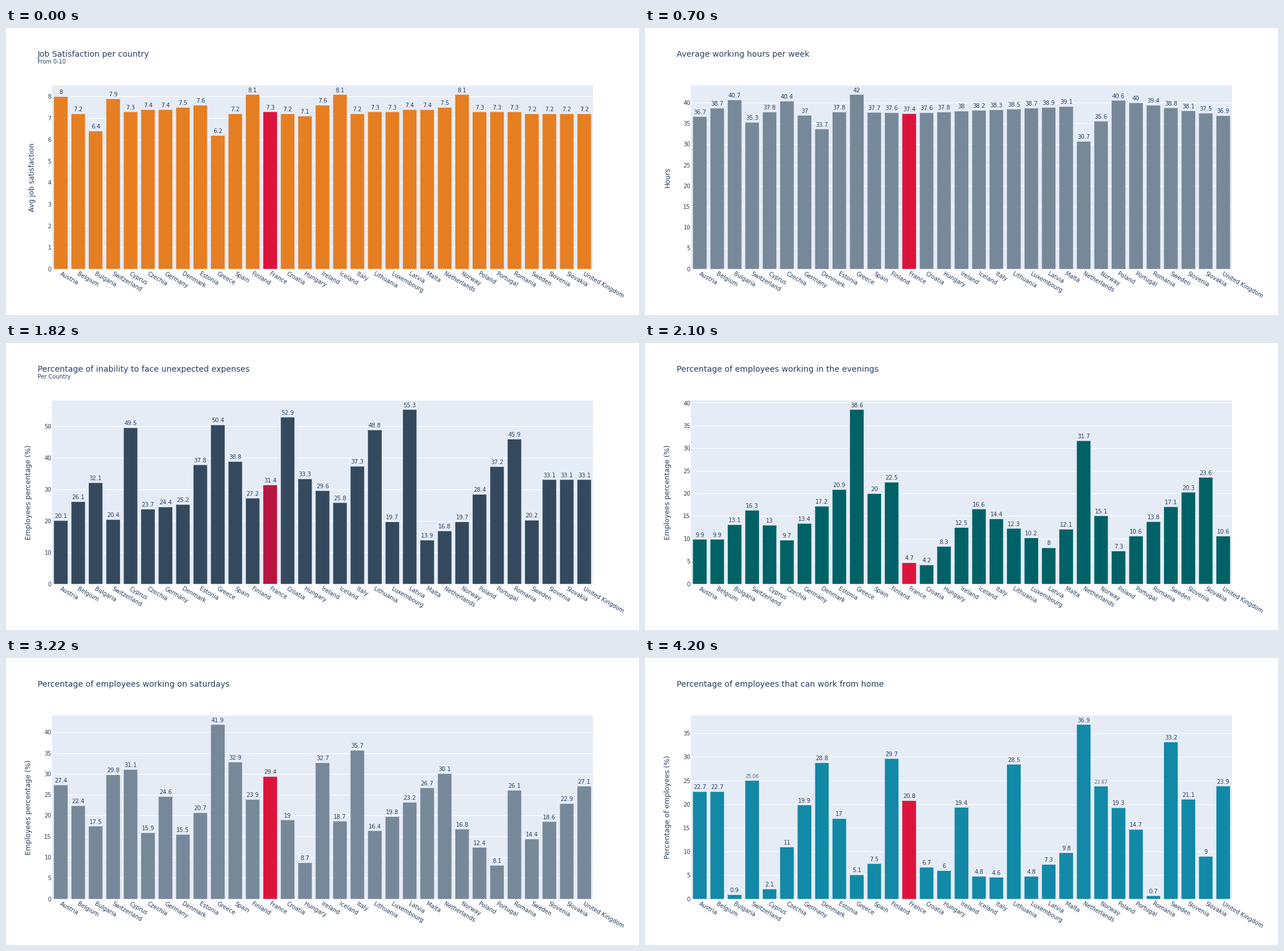
Write a matplotlib script that moves like this. It is 1100x500 px and loops after 4900 ms.

```python
from collections import namedtuple
import math

import matplotlib.pyplot as plt
import numpy as np
from matplotlib.animation import FuncAnimation
from matplotlib.patches import Rectangle

W, H, DPI = 1100, 500, 100
LEFT, RIGHT, TOP, BASE = 80, 1020, 100, 420
INK, PANEL, CRIMSON = "#2a3f5f", "#E5ECF6", "#DC143C"
PX = 72 / DPI  # points per pixel

plt.rcParams["font.family"] = "DejaVu Sans"

COUNTRIES = (
    "Austria,Belgium,Bulgaria,Switzerland,Cyprus,Czechia,Germany,Denmark,"
    "Estonia,Greece,Spain,Finland,France,Croatia,Hungary,Ireland,Iceland,"
    "Italy,Lithuania,Luxembourg,Latvia,Malta,Netherlands,Norway,Poland,"
    "Portugal,Romania,Sweden,Slovenia,Slovakia,United Kingdom"
).split(",")
SLOT = (RIGHT - LEFT) / len(COUNTRIES)


def series(UK=None, **points):
    """Key countries are fixed; those between them are interpolated."""
    if UK is not None:
        points["United Kingdom"] = UK
    known = [i for i, name in enumerate(COUNTRIES) if name in points]
    line = np.interp(range(len(COUNTRIES)), known,
                     [points[COUNTRIES[i]] for i in known])
    return [points.get(name, round(v, 1)) for name, v in zip(COUNTRIES, line)]


Chart = namedtuple("Chart", "values color step title ylabel subtitle accent",
                   defaults=("", CRIMSON))
SHARE = "Employees percentage (%)"
CHARTS = [
    Chart(series(Austria=8, Bulgaria=6.4, Switzerland=7.9, Cyprus=7.3,
                 Estonia=7.6, Greece=6.2, Finland=8.1, France=7.3,
                 Hungary=7.1, Iceland=8.1, Italy=7.2, Netherlands=7.5,
                 Norway=8.1, Poland=7.3, UK=7.2),
          "#E67E22", 1, "Job Satisfaction per country",
          "Avg job satisfaction", "From 0-10"),
    Chart(series(Austria=36.7, Bulgaria=40.7, Switzerland=35.3, Czechia=40.4,
                 Denmark=33.7, Greece=42, Spain=37.7, France=37.4, Malta=39.1,
                 Netherlands=30.7, Poland=40.6, UK=36.9),
          "#778899", 5, "Average working hours per week", "Hours"),
    Chart(series(Austria=20.1, Bulgaria=32.1, Switzerland=20.4, Cyprus=49.5,
                 Czechia=23.7, Denmark=25.2, Greece=50.4, Finland=27.2,
                 France=31.4, Croatia=52.9, Hungary=33.3, Iceland=25.8,
                 Lithuania=48.8, Luxembourg=19.7, Latvia=55.3, Malta=13.9,
                 Norway=19.7, Romania=45.9, Sweden=20.2, Slovenia=33.1),
          "#34495E", 10, "Percentage of inability to face unexpected expenses",
          SHARE, "Per Country", "#B71540"),
    Chart(series(Belgium=9.9, Switzerland=16.3, Czechia=9.7, Estonia=20.9,
                 Greece=38.6, Spain=20, Finland=22.5, France=4.7, Croatia=4.2,
                 Iceland=16.6, Latvia=8, Malta=12.1, Netherlands=31.7,
                 Norway=15.1, Poland=7.3, Slovakia=23.6, UK=10.6),
          "#006266", 5, "Percentage of employees working in the evenings",
          SHARE),
    Chart(series(Austria=27.4, Bulgaria=17.5, Switzerland=29.8, Cyprus=31.1,
                 Czechia=15.9, Germany=24.6, Denmark=15.5, Estonia=20.7,
                 Greece=41.9, Finland=23.9, France=29.4, Hungary=8.7,
                 Ireland=32.7, Iceland=18.7, Italy=35.7, Lithuania=16.4,
                 Netherlands=30.1, Norway=16.8, Portugal=8.1, Romania=26.1,
                 Sweden=14.4, UK=27.1),
          "#778899", 5, "Percentage of employees working on saturdays", SHARE),
    Chart(series(Austria=15, Bulgaria=7.8, Switzerland=16.8, Czechia=11.3,
                 Spain=17.9, France=14.7, Croatia=6.4, Hungary=6.1,
                 Ireland=21, Italy=15.3, Lithuania=9.6, Latvia=10.9,
                 Netherlands=20.9, Norway=10.6, Portugal=4.8, Romania=13.2,
                 UK=17.9),
          "#596275", 5, "Percentage of employees working on sundays", SHARE),
    Chart(series(Belgium=22.7, Bulgaria=0.9, Switzerland=25.06, Cyprus=2.1,
                 Denmark=28.8, Greece=5.1, Spain=7.5, Finland=29.7,
                 France=20.8, Croatia=6.7, Hungary=6, Ireland=19.4,
                 Iceland=4.8, Italy=4.6, Lithuania=28.5, Luxembourg=4.8,
                 Malta=9.8, Netherlands=36.9, Norway=23.87, Portugal=14.7,
                 Romania=0.7, Sweden=33.2, Slovakia=9, UK=23.9),
          "#1289A7", 5, "Percentage of employees that can work from home",
          "Percentage of employees (%)"),
]

fig = plt.figure(figsize=(W / DPI, H / DPI), dpi=DPI, facecolor="white")
ax = fig.add_axes([0, 0, 1, 1])


def text(x, y, s, size=10, ha="left", angle=0, alpha=1):
    ax.text(x, y, s, fontsize=size * PX, color=INK, ha=ha, va="baseline",
            rotation=angle, rotation_mode="anchor", alpha=alpha)


def box(x0, y0, x1, y1, color, **style):
    ax.add_patch(Rectangle((x0, y0), x1 - x0, y1 - y0, facecolor=color, **style))


def draw_axes(chart, peak, to_y):
    box(LEFT, TOP, RIGHT, BASE, PANEL, lw=0)
    for k in range(int(peak // chart.step) + 1):
        y = to_y(k * chart.step)
        if k:
            row = math.floor(y)
            box(LEFT, row, RIGHT, row + 1, "white", lw=0)
        text(79, y + 3.6, str(k * chart.step), ha="right")
    box(LEFT, BASE - 1, RIGHT, BASE + 1, "white", lw=0)


def draw_bar(i, value, color, to_y):
    mid = LEFT + (i + 0.5) * SLOT
    top = to_y(value)
    box(mid - 0.4 * SLOT, top, mid + 0.4 * SLOT, BASE, color,
        edgecolor=PANEL, lw=0.5 * PX, snap=False)
    label = f"{value:g}"
    if len(label) > 4:  # too wide for the bar, so shrunk
        text(mid, top - 4.5, label, 8.3, "center", alpha=0.75)
    else:
        text(mid, top - 4.5, label, ha="center")
    text(mid - 2.5, 430.3, COUNTRIES[i], angle=-30)


def draw(n):
    chart = CHARTS[n % len(CHARTS)]
    ax.clear()
    ax.set_xlim(0, W)
    ax.set_ylim(H, 0)
    ax.axis("off")

    peak = max(chart.values) / 0.95

    def to_y(v):
        return BASE - (BASE - TOP) * v / peak

    draw_axes(chart, peak, to_y)
    for i, value in enumerate(chart.values):
        color = chart.accent if COUNTRIES[i] == "France" else chart.color
        draw_bar(i, value, color, to_y)

    text(55, 50, chart.title, 14)
    text(55, 62, chart.subtitle, 9.8)
    text(49.5 if peak < 10 else 43, 260, chart.ylabel, 12.2, "center", 90)
    return []


anim = FuncAnimation(fig, draw, frames=len(CHARTS), init_func=lambda: draw(0),
                     interval=700, repeat=True, repeat_delay=0, blit=False)
plt.show()
```
